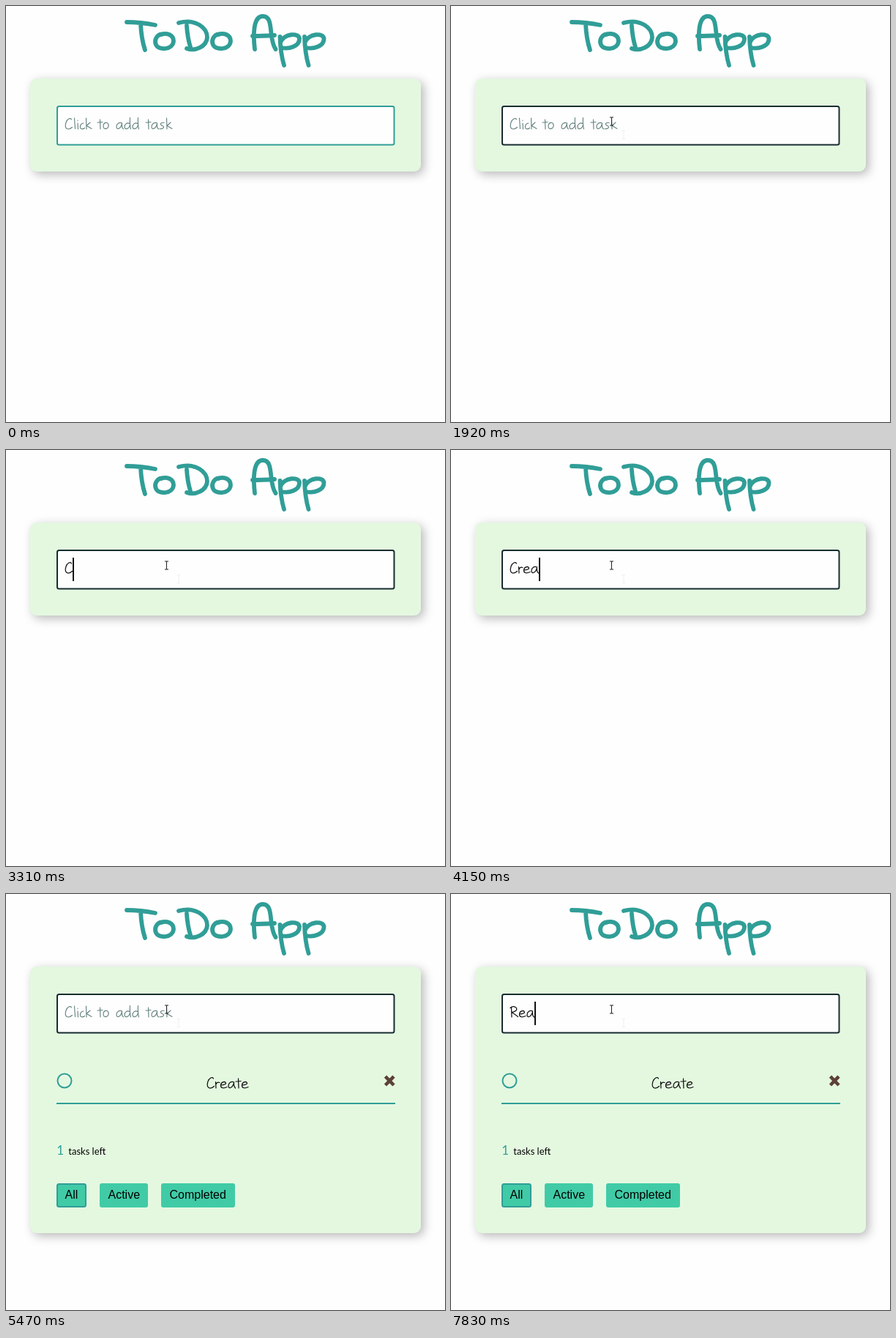
An HTML page for the animation above (8 s loop, 600 px wide and 568 px high).

```html
<!DOCTYPE html>
<html lang="en">
<head>
<meta charset="utf-8">
<title>ToDo App</title>
<style>
  html, body { margin: 0; width: 100%; height: 100%; overflow: hidden; background: #fefefe; }
  svg { position: absolute; inset: 0; }
  #card {
    position: absolute; left: 33px; top: 99px; width: 534px; height: 127px;
    border-radius: 9px; background: #e4f8e0; box-shadow: 4px 4px 14px rgba(0, 0, 0, .28);
  }
  #card.open { height: 364px; }
  .hand { fill: none; stroke-linecap: round; stroke-linejoin: round; stroke-width: 1.25; stroke: #111; }
  .hand.hint { stroke: #668481; stroke-width: 1.15; }
  .heading { stroke: #309e97; stroke-width: 5.8; }
  .line { fill: none; stroke: #309e97; stroke-width: 2; }
  .button { fill: #40cba6; }
  .label { font: 16px "Liberation Sans", Arial, sans-serif; }
  .beam { fill: none; stroke: #222; stroke-width: 1; }
</style>
</head>
<body>
<div id="card"></div>
<svg width="600" height="568" viewBox="0 0 600 568">
  <defs>
    <path id="beam" d="M-2.5-5.5H2.5M0-5.5V5.5M-2.5 5.5H2.5"/>
    <path id="o" d="M213 38.500C206 39 202 47 205 53C209 61 228 60 229 48C229 39 219 36 212 39"/>
    <path id="p" d="M374.500 42Q375 64 380 81M375 50C380 37 401 36 401 45C401 55 387 59 377 57"/>
  </defs>

  <g class="hand heading" role="img" aria-label="ToDo App">
    <path d="M165 22Q184 22 204 26M184 24Q185 45 190 60"/>
    <use href="#o"/>
    <path d="M247 27Q248 43 252 56M236 23C260 17 275 30 275 43C274 56 258 62 247 58"/>
    <use href="#o" x="78"/>
    <path d="M340 59C338 42 337 14 351 14C367 14 358 44 368.500 59M337 41Q350 41 367 40"/>
    <use href="#p"/>
    <use href="#p" x="33.5"/>
  </g>

  <rect id="field" x="70" y="137" width="460.5" height="52.6" rx="2.5" fill="#fefefe" stroke-width="2"/>
  <use id="ghost" class="beam" href="#beam" x="236" y="176" style="stroke:#f3eeee"/>
  <circle id="press" cx="218" cy="156" r="10" fill="#000" opacity=".08"/>
  <path id="entry" class="hand" role="img"/>
  <rect id="caret" y="147" width="2" height="32" fill="#111"/>

  <g id="list">
    <circle class="line" cx="80" cy="255" r="9.5"/>
    <path id="task" class="hand" role="img"/>
    <path d="M518.5 249.2L530 261M530 249.2L518.5 261" stroke="#5d4037" stroke-width="4.6"/>
    <path class="line" d="M69 286H532"/>
    <text x="69.3" y="356" fill="#309e97" style="font:17px Lato,sans-serif">1</text>
    <text x="85.3" y="356" style="font:13px Lato,sans-serif">tasks left</text>
    <rect class="button line" style="fill:#40cba6" x="70" y="396" width="39" height="31" rx="2.5"/>
    <rect class="button" x="128" y="395" width="66" height="33" rx="3"/>
    <rect class="button" x="212" y="395" width="101" height="33" rx="3"/>
    <g class="label">
      <text x="80.5" y="416">All</text>
      <text x="139.5" y="416">Active</text>
      <text x="223.5" y="416">Completed</text>
    </g>
  </g>

  <g id="tip">
    <rect x="552.5" y="552.5" width="37" height="20" fill="#fff" stroke="#bbb"/>
    <text x="558" y="569" fill="#666" style="font:10px 'Open Sans',sans-serif">Pause</text>
  </g>
  <path id="arrow" d="M0 0V13L3 10L5 15L7 14L5 9.5H9.5Z" fill="#fff" stroke="#333" stroke-width=".8"/>
  <use id="cursor" class="beam" href="#beam"/>
</svg>

<script>
const LOOP = 8000;
const HINT = 'Click to add task';
const $ = id => document.getElementById(id);

// Handwritten letters: advance width, then strokes on a baseline at 0.
const letters = {
  ' ': [8, ''],
  C: [11, 'm9.5-13c-1.5-3-5.5-1-7.5 4c-2 6 0 9 3 9c2.5 0 4-1 5.5-2.5'],
  R: [12, 'm2.5-13l.5 13m-2-12.5c5-4.5 11 .5 8 3.5q-2 2-6 2.5q4 2.5 8.5 6'],
  a: [11, 'm8.7-8c-4-2-7.7 1-7.7 5c0 4 5 4 7.5-4q-.5 5 2 7'],
  c: [8, 'm6-8c-3 0-5 3-4.5 6c.5 3 4.5 2 6 .5'],
  d: [11, 'm8-7.5c-4-2-7 1.5-7 4.5c0 4 6 4 7.5-3m0-9.5q-.5 9.5 1 15.5'],
  e: [11, 'm1.5-4q7.5-.5 7-3c-1.5-3-7-1-7 3.5c0 4 4.5 4 8.5 2'],
  i: [4, 'm2-8l.5 8m-.5-12v.6'],
  k: [9, 'm1.5-15l.5 15m5-9l-5 4.5q3 1.5 7 4'],
  l: [5, 'm2.5-15l1 14.5'],
  o: [10, 'm5-9c-4 0-5 6-3 8c3 2 7-1 6-5c-.5-2.5-3-3.5-5-2'],
  r: [7, 'm1.5-8.5l.5 8.5m0-5q1.5-4 5-2.5'],
  s: [9, 'm7-8.5c-4-1-6 1.5-3.5 3.5c4.5 1 4 5-2.5 4.7'],
  t: [7, 'm3.5-13l.5 13m-4-9l7-.5']
};

const advance = text => [...text].reduce((sum, ch) => sum + letters[ch][0], 0);

function write(node, text, x, baseline) {
  let d = '';
  for (const ch of text) {
    const [width, strokes] = letters[ch];
    if (strokes) d += `M${x} ${baseline}${strokes}`;
    x += width;
  }
  node.setAttribute('d', d);
  node.setAttribute('aria-label', text);
}

// Each step holds until the next: time, typed text, caret visible.
const typing = [
  [0, '', 0], [1960, '', 1], [2320, '', 0], [2830, '', 1],
  [3310, 'C', 1], [3660, 'Cr', 1], [3840, 'Cre', 1], [4150, 'Crea', 1],
  [4380, 'Creat', 1], [4660, 'Create', 1], [5210, 'Create', 0],
  [5470, '', 0], [5700, '', 1], [6240, '', 0], [6770, '', 1],
  [7260, 'R', 1], [7530, 'Re', 1], [7830, 'Rea', 1]
];
const beamPath = [
  [1020, 236, 176], [1080, 235, 173], [1140, 233, 168], [1190, 229.5, 162.5],
  [1240, 224, 154], [1320, 218, 149], [1490, 218, 151], [1530, 218, 154], [1570, 219.5, 157.5]
];
const arrowPath = [[600, 582, 563], [655, 574, 561], [710, 561, 560]];

const stepAt = (steps, t) => steps.findLast(step => step[0] <= t);
const show = (id, on) => { $(id).style.display = on ? '' : 'none'; };

function place(id, steps, t, end = LOOP) {
  const step = t < end && stepAt(steps, t);
  show(id, step);
  if (step) $(id).setAttribute('transform', `translate(${step[1]} ${step[2]})`);
}

function draw(t) {
  const [, text, caret] = stepAt(typing, t);
  const added = t >= 5470;

  write($('entry'), text || HINT, 80, 168);
  $('entry').classList.toggle('hint', !text);
  $('caret').setAttribute('x', 80 + advance(text));
  show('caret', caret);
  $('field').setAttribute('stroke', t < 1920 ? '#309e97' : '#172d31');

  $('card').classList.toggle('open', added);
  show('list', added);
  show('ghost', t >= 1020);
  show('press', t >= 1740 && t < 1920);
  show('tip', t >= 1020 && t < 1320);
  place('cursor', beamPath, t);
  place('arrow', arrowPath, t, 770);
}

write($('task'), 'Create', 274, 265);
const start = performance.now();
function tick() {
  draw((performance.now() - start) % LOOP);
  requestAnimationFrame(tick);
}
tick();
</script>
</body>
</html>
```
